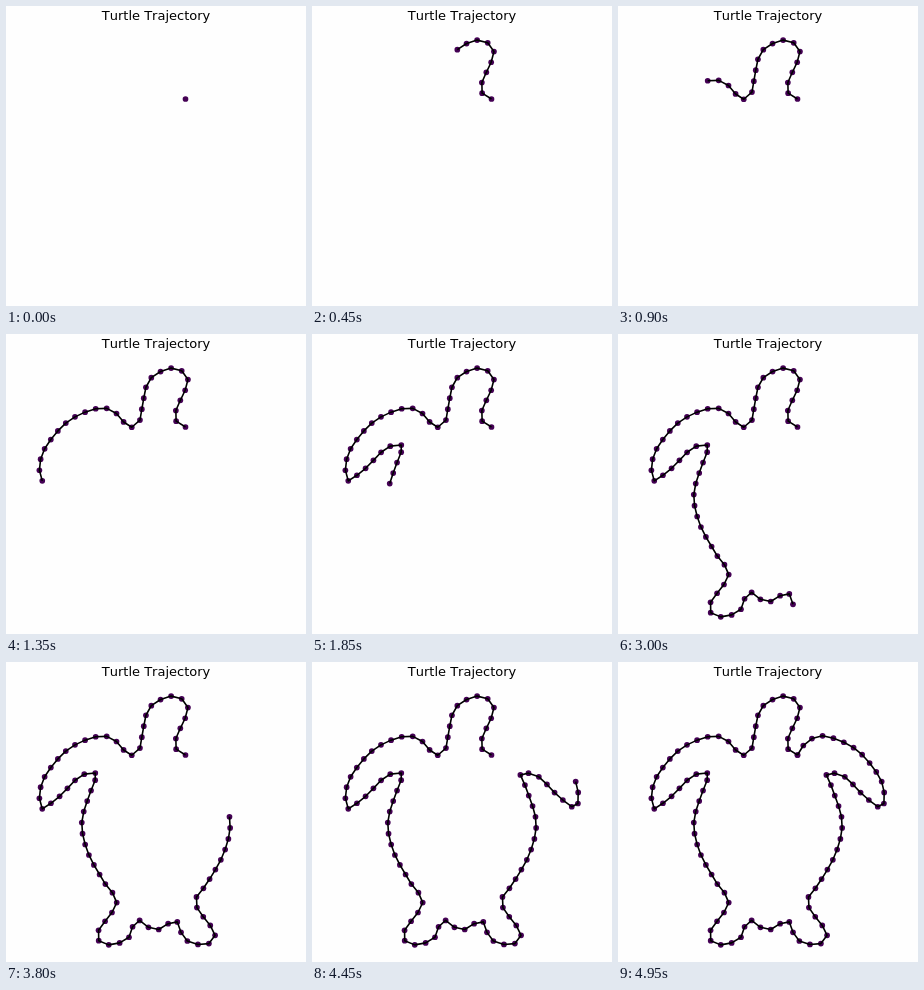
An HTML page with a canvas that plays this animation: 300x300 px, repeating every 5 s.

```html
<!DOCTYPE html>
<html lang="en">
<head>
<meta charset="utf-8">
<title>Turtle Trajectory</title>
<style>
  html, body { margin: 0; width: 100%; height: 100%; overflow: hidden; background: #fefefe; }
  canvas { display: block; }
</style>
</head>
<body>
<canvas id="stage" width="300" height="300"></canvas>
<script>
const ctx = document.getElementById("stage").getContext("2d");
const SIZE = 300;
const STEP_MS = 50;
const DOTS = 100;

// Key points of smooth curves that meet at corners.
const shoulder = [120.5, 93], tip = [36.5, 147.5], armpit = [92.5, 111];
const head = [
  mirror(shoulder), [170, 87], [170, 76], [182, 46], [167, 34],
  [144, 45], [137, 68], [134, 86], [126.3, 93], shoulder
];
const leftSide = [
  [shoulder, [111.2, 80], [93.4, 74], [62.2, 87.2], [38.7, 114.7], [33.4, 136], tip],
  [tip, [53.7, 134.2], [70.5, 117], [79.8, 111.7], armpit],
  [armpit, [85, 128.7], [75.8, 160.5], [82.2, 191.2], [98.6, 220.8], [110.7, 241],
    [92.7, 268], [92.5, 278.4], [102, 282.8], [113.3, 281], [122.7, 275.7],
    [128, 261], [133, 258.2], [142.3, 265.2], [150, 268.5]]
];
const rightSide = leftSide.map(curve => curve.map(mirror).reverse()).reverse();

function mirror([x, y]) {
  return [SIZE - x, y];
}

const mix = (a, b, t) => a.map((v, i) => v + (b[i] - v) * t);

// Catmull-Rom spline as a fine polyline.
function smooth(points) {
  const fine = [];
  const last = points.length - 1;
  for (let i = 0; i < last; i++) {
    const a = points[i], b = points[i + 1];
    const before = points[Math.max(i - 1, 0)], after = points[Math.min(i + 2, last)];
    for (let t = 0; t < 1; t += 1 / 16) {
      const u = 1 - t;
      fine.push(a.map((v, k) =>
        v * u * u * (1 + 2 * t) + b[k] * t * t * (3 - 2 * t) +
        (b[k] - before[k]) / 2 * t * u * u - (after[k] - v) / 2 * t * t * u));
    }
  }
  return [...fine, points[last]];
}

// Points at equal distances along a polyline.
function resample(line, count) {
  const along = [0];
  for (let i = 1; i < line.length; i++) {
    const [ax, ay] = line[i - 1], [bx, by] = line[i];
    along.push(along[i - 1] + Math.hypot(bx - ax, by - ay));
  }
  const total = along[along.length - 1];
  let i = 1;
  return Array.from({ length: count }, (_, n) => {
    const distance = total * n / (count - 1);
    while (i < line.length - 1 && along[i] < distance) i++;
    const span = along[i] - along[i - 1] || 1;
    return mix(line[i - 1], line[i], (distance - along[i - 1]) / span);
  });
}

const trail = resample([head, ...leftSide, ...rightSide].flatMap(smooth), DOTS);

function draw(count) {
  ctx.fillStyle = "#fefefe";
  ctx.fillRect(0, 0, SIZE, SIZE);

  ctx.fillStyle = "#000";
  ctx.font = '13px "DejaVu Sans", sans-serif';
  ctx.fontKerning = "none";
  ctx.textAlign = "center";
  ctx.fillText("Turtle Trajectory", SIZE / 2, 14);

  const visible = trail.slice(0, count);
  ctx.fillStyle = "#440154";
  for (const [x, y] of visible) {
    ctx.beginPath();
    ctx.arc(x, y, 2.85, 0, Math.PI * 2);
    ctx.fill();
  }

  ctx.strokeStyle = "#000";
  ctx.lineWidth = 1.6;
  ctx.lineJoin = "round";
  ctx.beginPath();
  for (const [x, y] of visible) ctx.lineTo(x, y);
  ctx.stroke();
}

const start = performance.now();
function tick() {
  const elapsed = performance.now() - start;
  draw(Math.floor(elapsed / STEP_MS) % DOTS + 1);
  requestAnimationFrame(tick);
}
tick();
</script>
</body>
</html>
```
